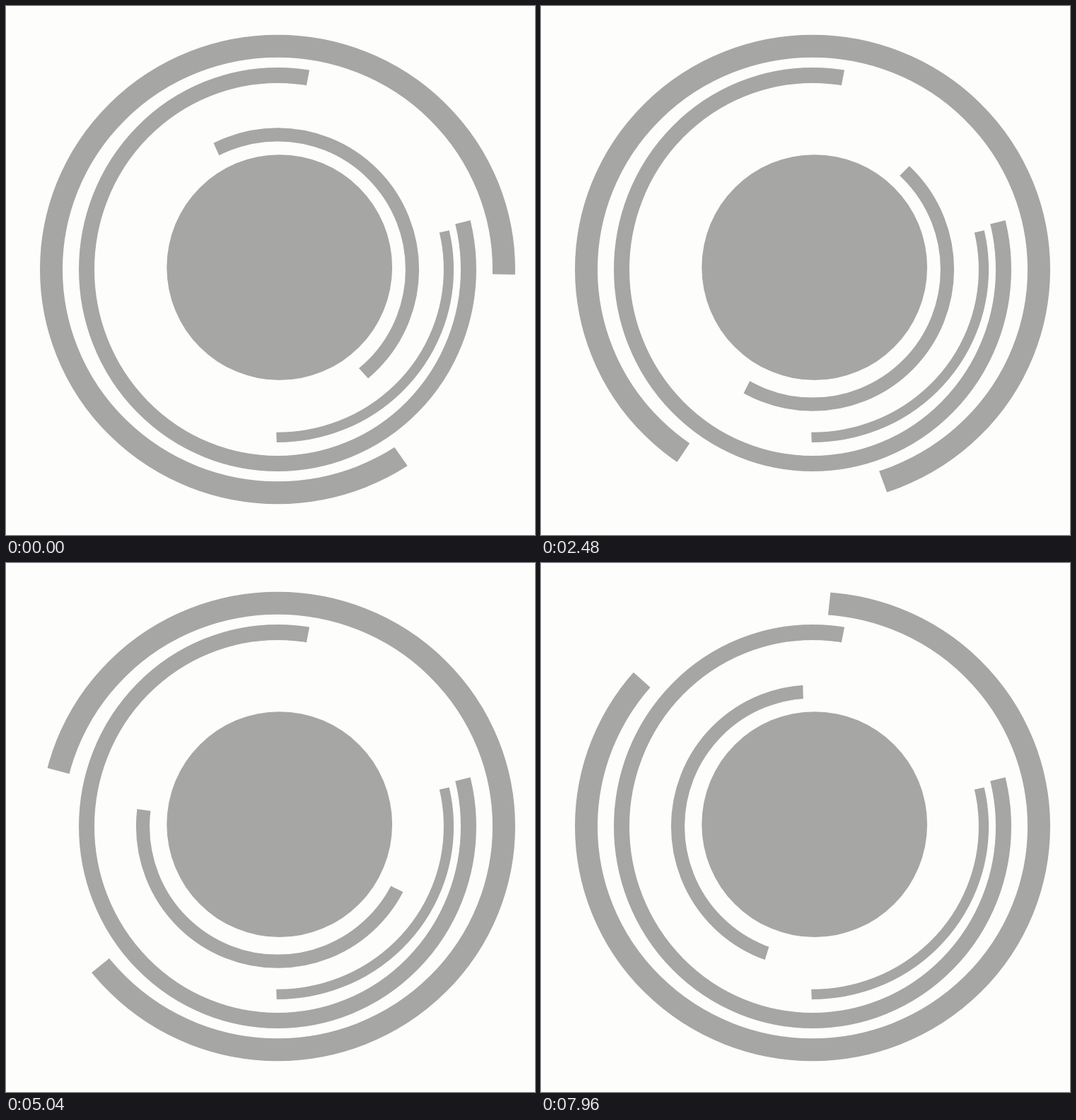
Recreate the animation shown at these times as an HTML page with a canvas. Size 748 px wide and 748 px high, loop 8 s.

```html
<!DOCTYPE html>
<html lang="en">
<head>
<meta charset="utf-8">
<title>Rotating arcs</title>
<style>
  html, body { margin: 0; width: 100%; height: 100%; overflow: hidden; background: #fdfdfc; }
  canvas { display: block; width: 748px; height: 748px; }
</style>
</head>
<body>
<canvas id="stage" width="748" height="748"></canvas>
<script>
const ctx = document.getElementById('stage').getContext('2d');
const INK = '#a6a6a5', PAPER = '#fdfdfc';
const LOOP = 8000, STEP = 40, TURN = 12960;
const PIVOT = 374, CX = 384, CY = 372.5;

// Each ring is visible only inside a wedge around the stage centre (degrees).
const rings = [
  { rx: 320,   ry: 315.7, width: 32,   from: 54.95,   to: 360.95, spins: true },
  { rx: 270,   ry: 274.5, width: 22,   from: -14.1,   to: 281,    spins: false },
  { rx: 242,   ry: 237.4, width: 14.2, from: -12.65,  to: 87.95,  spins: false },
  { rx: 190.5, ry: 190.7, width: 19.2, from: -114.08, to: 47.86,  spins: true }
];

const rad = deg => deg * Math.PI / 180;

function drawRing({ rx, ry, width, from, to, spins }, angle) {
  const turn = spins ? angle : 0;
  ctx.save();
  ctx.beginPath();
  ctx.moveTo(PIVOT, PIVOT);
  ctx.arc(PIVOT, PIVOT, 600, rad(from + turn), rad(to + turn));
  ctx.closePath();
  ctx.clip();
  ctx.beginPath();
  ctx.ellipse(CX, CY, rx, ry, 0, 0, 2 * Math.PI);
  ctx.lineWidth = width;
  ctx.stroke();
  ctx.restore();
}

function draw(time) {
  const angle = Math.floor(time % LOOP / STEP) * STEP / TURN * 360;
  ctx.fillStyle = PAPER;
  ctx.fillRect(0, 0, 748, 748);
  ctx.fillStyle = ctx.strokeStyle = INK;
  ctx.beginPath();
  ctx.arc(386.7, 369.6, 159.4, 0, 2 * Math.PI);
  ctx.fill();
  rings.forEach(ring => drawRing(ring, angle));
}

const start = performance.now();
function tick() {
  draw(performance.now() - start);
  requestAnimationFrame(tick);
}
tick();
</script>
</body>
</html>
```
